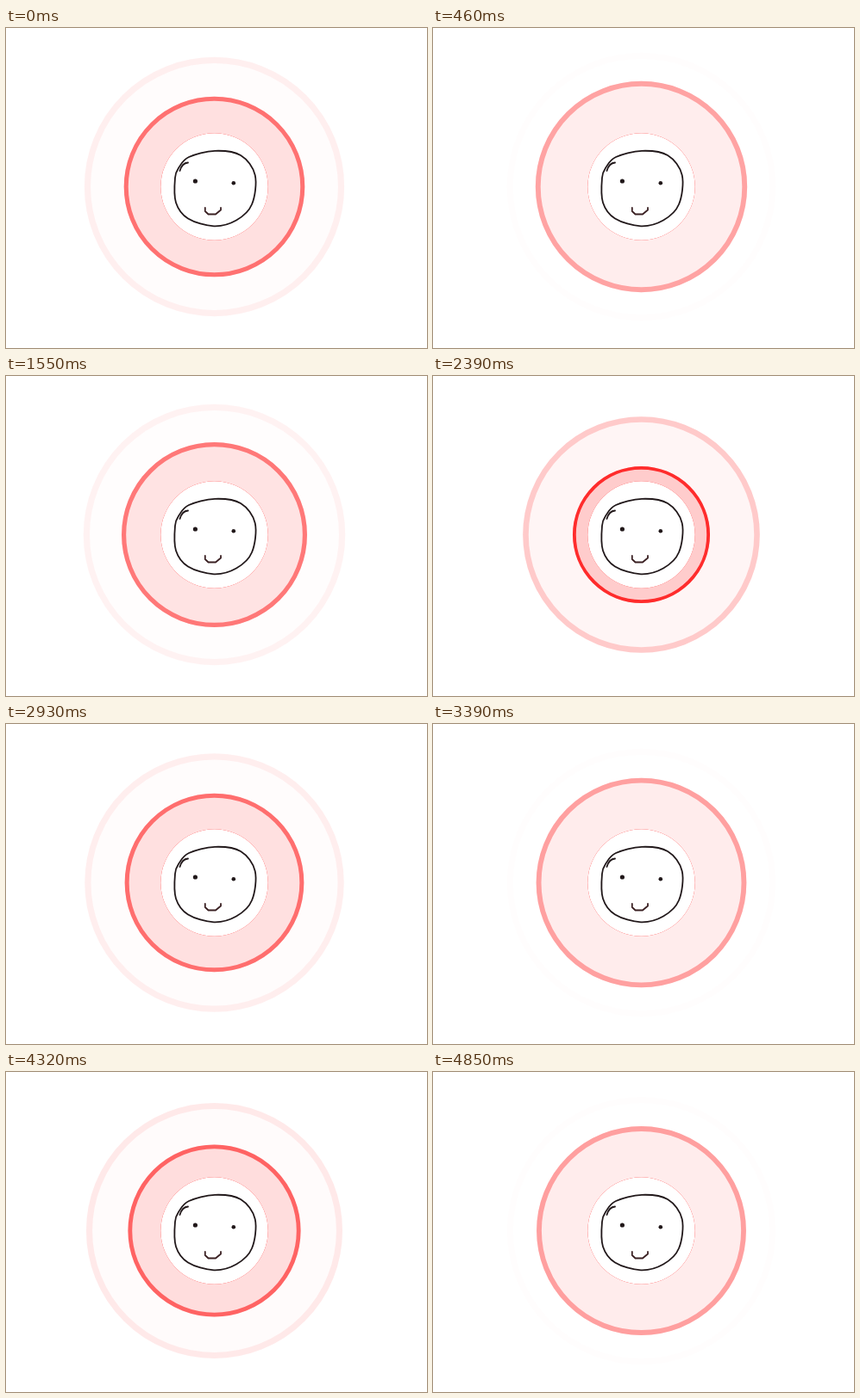
Animation of 488 by 372 pixels, one loop 4.93 s. Source, as an HTML page:

```html
<!DOCTYPE html>
<html lang="en">
<head>
<meta charset="utf-8">
<title>Pulsing face</title>
<style>
  html, body { margin: 0; width: 100%; height: 100%; overflow: hidden; background: #fff; }
  svg { display: block; }
</style>
</head>
<body>
<svg width="488" height="372" viewBox="0 0 488 372">
  <defs>
    <g id="disc">
      <circle r="62.5" fill="#f00" fill-opacity=".2"/>
      <circle r="61" fill="none" stroke="#f00" stroke-width="3"/>
    </g>
  </defs>
  <g transform="translate(241.5 184.5)">
    <use class="ring" href="#disc"/>
    <use class="ring" href="#disc"/>
    <circle r="62.2" fill="#f00"/>
    <circle r="62.2" fill="#fff"/>
  </g>
  <g fill="none" stroke="#21181a" stroke-width="1.8" stroke-linecap="round" stroke-linejoin="round">
    <path id="head"/>
    <path d="M201.5 166Q204 157 211 156.5"/>
    <path d="M230.8 209V213L234.5 216.5H243L249 211.5V209" stroke="#3a2022"/>
  </g>
  <g fill="#21181a">
    <circle cx="219.4" cy="178" r="2.6"/>
    <circle cx="263.8" cy="180.2" r="2.3"/>
  </g>
</svg>
<script>
const LOOP = 4930, FRAMES = 64, STEP = LOOP / FRAMES;
const LIFE = 2950, BIRTH = 577, GROWTH = 1.5;
const rings = document.querySelectorAll('.ring');

// Closed Catmull-Rom curve through a few key points.
function closedCurve(points) {
  const at = i => points[(i + points.length) % points.length];
  const handle = (i, sign) =>
    [0, 1].map(k => at(i)[k] + sign * (at(i + 1)[k] - at(i - 1)[k]) / 6);
  return `M${at(0)}` + points.map((_, i) =>
    `C${handle(i, 1)} ${handle(i + 1, -1)} ${at(i + 1)}`).join('') + 'Z';
}

document.getElementById('head').setAttribute('d', closedCurve([
  [200.5, 162], [212, 150], [242, 142.8], [272, 148], [288.7, 171], [285, 205],
  [267, 223.5], [241, 230.3], [211, 221.5], [197, 203], [196, 174]
]));

// Ease-out, cubic-bezier(0, 0, .58, 1), solved by bisection.
function easeOut(x) {
  let u = 0.5;
  for (let d = 0.25; d > 1e-6; d /= 2) {
    u += u * u * (1.74 - 0.74 * u) < x ? d : -d;
  }
  return u * u * (3 - 2 * u);
}

function draw(ms) {
  const t = Math.floor((ms % LOOP + 5) / STEP) % FRAMES * STEP;
  rings.forEach((ring, i) => {
    const age = (t - BIRTH + LIFE * (1 + i / 2)) % LIFE;
    const p = easeOut(age / LIFE);
    ring.setAttribute('transform', `scale(${1 + GROWTH * p})`);
    ring.setAttribute('opacity', 1 - p);
  });
}

const begin = performance.now();
function tick() {
  draw(Math.max(0, performance.now() - begin));
  requestAnimationFrame(tick);
}
tick();
</script>
</body>
</html>
```
